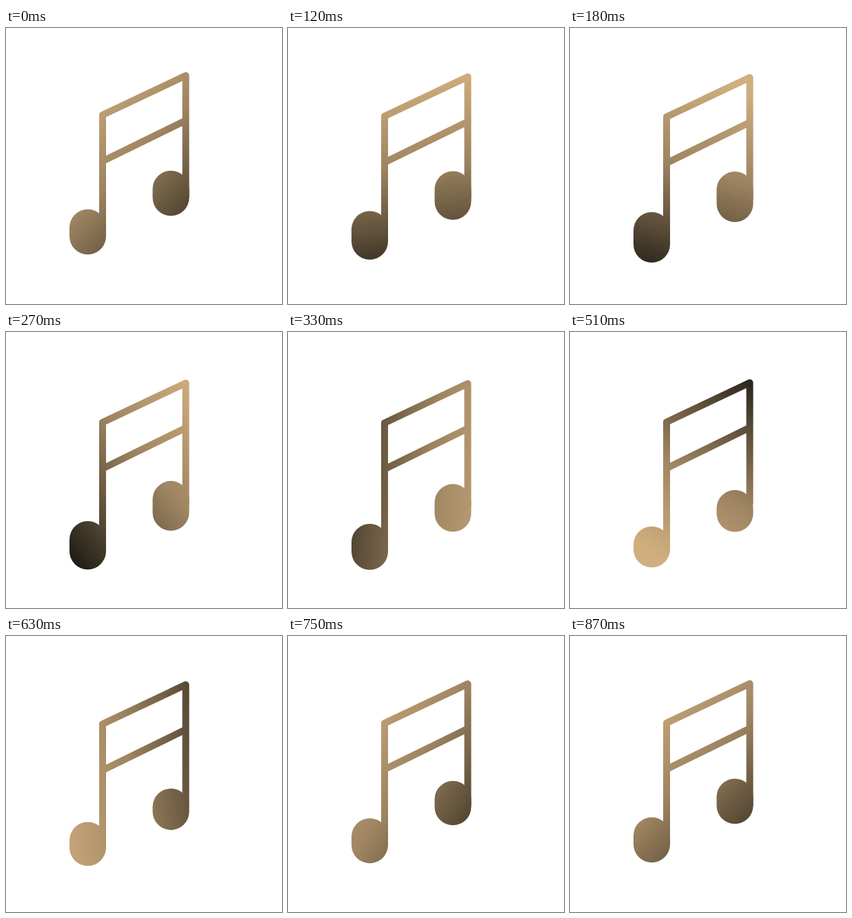
These frames come from a looping animation (400x400 px, 2.96 s). An HTML page without scripts:

```html
<!DOCTYPE html>
<html lang="en">
<head>
<meta charset="utf-8">
<title>Music note</title>
<style>
  html, body { margin: 0; width: 100%; height: 100%; overflow: hidden; background: #fff; }
  svg { display: block; width: 100vw; height: 100vh; }

  .frame, .head, .shade { animation: 2960ms linear infinite; }
  .frame { animation-name: frame; }
  .left  { animation-name: left; }
  .right { animation-name: right; }
  .shade { animation-name: shade; }

  /* The note dips and springs back, then rests */
  @keyframes frame {
    0%      { transform: translateY(0); animation-timing-function: cubic-bezier(.4, .1, .7, .8); }
    6.081%  { transform: translateY(2.7px); }
    9.122%  { transform: translateY(5px); }
    13.176% { transform: translateY(6.3px); }
    17.23%  { transform: translateY(4.6px); }
    21.284% { transform: translateY(1.6px); animation-timing-function: cubic-bezier(.2, .4, .5, 1); }
    29.392%, 100% { transform: translateY(0); }
  }
  @keyframes left {
    0%      { y: 262.7px; height: 65.6px; animation-timing-function: cubic-bezier(.4, .1, .7, .8); }
    6.081%  { y: 266.7px; height: 73.3px; }
    9.122%  { y: 274px; height: 70.2px; }
    13.176% { y: 281.7px; height: 63.6px; }
    17.23%  { y: 281.8px; height: 59.6px; }
    21.284% { y: 269.6px; height: 63.6px; animation-timing-function: cubic-bezier(.2, .4, .5, 1); }
    29.392%, 100% { y: 262.7px; height: 65.6px; }
  }
  @keyframes right {
    0%      { y: 206.7px; height: 65.6px; animation-timing-function: cubic-bezier(.4, .1, .7, .8); }
    6.081%  { y: 207.8px; height: 73.3px; }
    9.122%  { y: 215.8px; height: 72.3px; }
    13.176% { y: 224.8px; height: 66.2px; }
    17.23%  { y: 229px; height: 60.8px; }
    21.284% { y: 221.2px; height: 60px; animation-timing-function: cubic-bezier(.2, .4, .5, 1); }
    29.392%, 100% { y: 206.7px; height: 65.6px; }
  }

  /* The light turns once around the note */
  @keyframes shade {
    0%      { transform: translate(179px, 196px) rotate(45deg) translateX(0); animation-timing-function: cubic-bezier(.4, .1, .7, .8); }
    6.081%  { transform: translate(179px, 203px) rotate(105deg) translateX(0); }
    9.122%  { transform: translate(179px, 207px) rotate(140deg) translateX(-28px); }
    13.176% { transform: translate(179px, 208px) rotate(230deg) translateX(-28px); }
    17.23%  { transform: translate(179px, 205px) rotate(302deg) translateX(0); }
    21.284% { transform: translate(179px, 199px) rotate(352deg) translateX(0); animation-timing-function: cubic-bezier(.2, .4, .5, 1); }
    29.392% { transform: translate(179px, 196px) rotate(405deg) translateX(0); }
    100%    { transform: translate(179px, 196px) rotate(405deg) translateX(0); }
  }
</style>
</head>
<body>
<svg viewBox="0 0 400 400">
  <defs>
    <linearGradient id="gold" gradientUnits="userSpaceOnUse" x1="-130" y1="0" x2="190" y2="0">
      <stop offset="0" stop-color="#d0ae7e"/>
      <stop offset=".406" stop-color="#9e8461"/>
      <stop offset=".688" stop-color="#5f503a"/>
      <stop offset=".906" stop-color="#28231a"/>
      <stop offset="1" stop-color="#12100b"/>
    </linearGradient>
    <mask id="note" maskUnits="userSpaceOnUse" x="0" y="0" width="400" height="400">
      <path class="frame" d="M140 302V126L260.5 69V246M140 193L260.5 134"
            fill="none" stroke="#fff" stroke-width="10" stroke-linejoin="round"/>
      <rect class="head left" x="92" y="262.7" width="53" height="65.6" rx="26.5" ry="26.5" fill="#fff"/>
      <rect class="head right" x="212.5" y="206.7" width="53" height="65.6" rx="26.5" ry="26.5" fill="#fff"/>
    </mask>
  </defs>
  <g mask="url(#note)">
    <rect class="shade" x="-400" y="-400" width="800" height="800" fill="url(#gold)"/>
  </g>
</svg>
</body>
</html>
```
